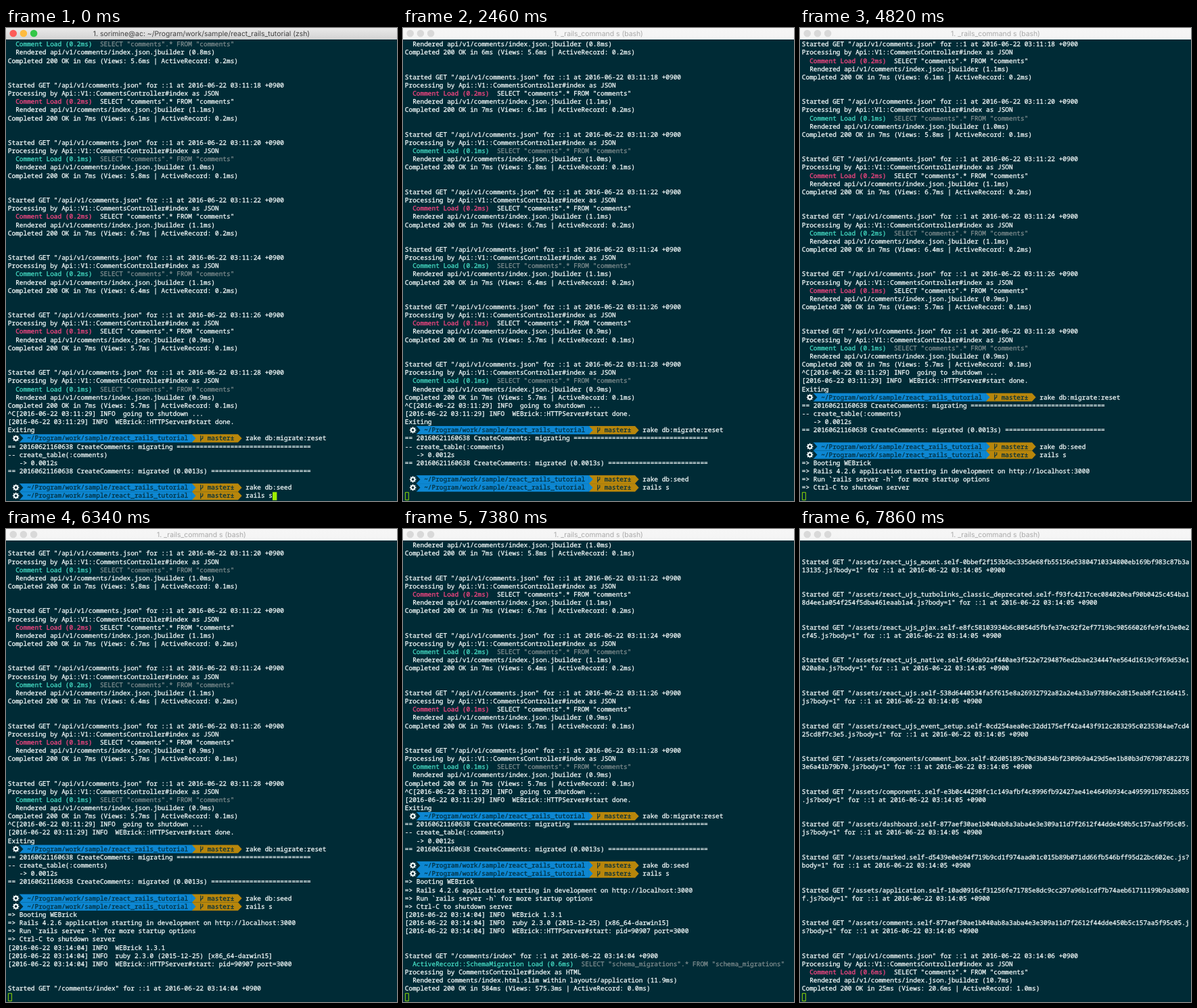
Recreate the animation shown at these times as an HTML page with a canvas. Size 578 px wide and 700 px high, loop 8 s.

```html
<!DOCTYPE html>
<html lang="en">
<head>
<meta charset="utf-8">
<title>Rails server start</title>
<style>
html, body { margin: 0; width: 100%; height: 100%; overflow: hidden; background: #002b36; }
canvas { display: block; width: 578px; height: 700px; }
</style>
</head>
<body>
<canvas id="stage"></canvas>
<script>
const W = 578, H = 700, LOOP = 8000;
const LEFT = 2.8, TOP = 18, CELL = 5.67, LINE = 12.15;
const COLS = 101, ROWS = 56, BAR = 17;
const MONO = '"Noto Sans Mono", "DejaVu Sans Mono", monospace';
const SANS = 'Inter, "Liberation Sans", sans-serif';
const C = {
  bg: '#002b36', text: '#f2f9f9', dim: '#7d8b8d', pink: '#fb4683', cyan: '#45dcc4',
  blue: '#0d87d2', gold: '#b8860b', ink: '#04303f', cursor: '#9fee00'
};

const canvas = document.getElementById('stage');
const ratio = window.devicePixelRatio || 1;
canvas.width = W * ratio;
canvas.height = H * ratio;
const ctx = canvas.getContext('2d');
ctx.scale(ratio, ratio);

// A row is a list of spans: [column, text, colour].
const plain = text => [[0, text, C.text]];
const blank = () => [];

function wrap(text) {
  const rows = [];
  for (let i = 0; i < text.length; i += COLS) rows.push(plain(text.slice(i, i + COLS)));
  return rows;
}

function load(model, ms, table, hot) {
  const head = `${model} Load (${ms}ms)`;
  return [
    [2, head, hot ? C.pink : C.cyan],
    [head.length + 4, `SELECT "${table}".* FROM "${table}"`, hot ? C.text : C.dim]
  ];
}

const started = (path, time) => `Started GET "${path}" for ::1 at 2016-06-22 ${time} +0900`;
const completed = (total, views, db) =>
  plain(`Completed 200 OK in ${total}ms (Views: ${views}ms | ActiveRecord: ${db}ms)`);
const info = (time, text) => plain(`[2016-06-22 ${time}] INFO  ${text}`);

const apiStart = time => [
  plain(started('/api/v1/comments.json', time)),
  plain('Processing by Api::V1::CommentsController#index as JSON')
];
const apiEnd = (db, render, total, views, hot, dbTotal = db) => [
  load('Comment', db, 'comments', hot),
  plain(`  Rendered api/v1/comments/index.json.jbuilder (${render}ms)`),
  completed(total, views, dbTotal)
];
const poll = (sec, ...rest) => [blank(), blank(), ...apiStart('03:11:' + sec), ...apiEnd(...rest)];

function prompt(command) {
  const row = [
    [5, '~/Program/work/sample/react_rails_tutorial', C.ink],
    [52, 'master±', C.ink],
    [62, command, C.text]
  ];
  row.isPrompt = true;
  return row;
}

const migration = state => plain(`== 20160621160638 CreateComments: ${state} `.padEnd(79, '='));

const history = [
  ...apiEnd('0.2', '0.8', 6, '5.6', false),
  ...poll(18, '0.2', '1.1', 7, '6.1', true),
  ...poll(20, '0.1', '1.0', 7, '5.8', false),
  ...poll(22, '0.2', '1.1', 7, '6.7', true),
  ...poll(24, '0.2', '1.1', 7, '6.4', false),
  ...poll(26, '0.1', '0.9', 7, '5.7', true),
  ...poll(28, '0.1', '0.9', 7, '5.7', false),
  plain('^C[2016-06-22 03:11:29] INFO  going to shutdown ...'),
  info('03:11:29', 'WEBrick::HTTPServer#start done.'),
  plain('Exiting'),
  prompt('rake db:migrate:reset'),
  migration('migrating'),
  plain('-- create_table(:comments)'),
  plain('   -> 0.0012s'),
  migration('migrated (0.0013s)'),
  blank(),
  prompt('rake db:seed'),
  prompt('rails s')
];

const assets = [
  'react_ujs_mount.self-0bbef2f153b5bc335de68fb55156e53804710334800eb169bf983c87b3a13135',
  'react_ujs_turbolinks_classic_deprecated.self-f93fc4217cec084020eaf90b0425c454ba18d4ee1a054f254f5dba461eaab1a4',
  'react_ujs_pjax.self-e8fc58103934b6c8054d5fbfe37ec92f2ef7719bc90566026fe9fe19e0e2cf45',
  'react_ujs_native.self-69da92af440ae3f522e7294876ed2bae234447ee564d1619c9f69d53e1020a8a',
  'react_ujs.self-538d6440534fa5f615e8a26932792a82a2e4a33a97886e2d815eab8fc216d415',
  'react_ujs_event_setup.self-0cd254aea0ec32dd175eff42a443f912c283295c0235384ae7cd425cd8f7c3e5',
  'components/comment_box.self-02d05189c70d3b034bf2309b9a429d5ee1b80b3d767987d822783e6a41b79b70',
  'components.self-e3b0c44298fc1c149afbf4c8996fb92427ae41e4649b934ca495991b7852b855',
  'dashboard.self-877aef30ae1b040ab8a3aba4e3e309a11d7f2612f44dde450b5c157aa5f95c05',
  'marked.self-d5439e0eb94f719b9cd1f974aad01c015b89b071dd66fb546bff95d22bc602ec',
  'application.self-10ad0916cf31256fe71785e8dc9cc297a96b1cdf7b74aeb61711199b9a3d003f',
  'comments.self-877aef30ae1b040ab8a3aba4e3e309a11d7f2612f44dde450b5c157aa5f95c05'
];

const ENTER = 420, BASH = 960, BLUR = 2280;

// Server output: [time, rows].
const output = [
  [4460, [
    plain('=> Booting WEBrick'),
    plain('=> Rails 4.2.6 application starting in development on http://localhost:3000'),
    plain('=> Run `rails server -h` for more startup options'),
    plain('=> Ctrl-C to shutdown server')
  ]],
  [5460, [
    info('03:14:04', 'WEBrick 1.3.1'),
    info('03:14:04', 'ruby 2.3.0 (2015-12-25) [x86_64-darwin15]'),
    info('03:14:04', 'WEBrick::HTTPServer#start: pid=90907 port=3000')
  ]],
  [6320, [blank(), blank(), plain(started('/comments/index', '03:14:04'))]],
  [6420, [load('ActiveRecord::SchemaMigration', '0.6', 'schema_migrations', false)]],
  [6500, [plain('Processing by CommentsController#index as HTML')]],
  [7100, [
    plain('  Rendered comments/index.html.slim within layouts/application (11.9ms)'),
    completed(584, '575.3', '0.0')
  ]],
  ...assets.map((name, i) => [7400 + 20 * i, [
    blank(), blank(), ...wrap(started(`/assets/${name}.js?body=1`, '03:14:05'))
  ]]),
  [7780, [blank(), blank(), ...apiStart('03:14:06')]],
  [7820, apiEnd('0.6', '10.7', 25, '20.6', true, '1.0')]
];

const colX = col => LEFT + col * CELL;

function fillPath(color, ...points) {
  ctx.fillStyle = color;
  ctx.beginPath();
  points.forEach(([x, y]) => ctx.lineTo(x, y));
  ctx.fill();
}

function strokePath(color, width, ...points) {
  ctx.strokeStyle = color;
  ctx.lineWidth = width;
  ctx.beginPath();
  points.forEach(([x, y], i) => i ? ctx.lineTo(x, y) : ctx.moveTo(x, y));
  ctx.stroke();
}

function arrow(col, y, color) {
  const x = colX(col);
  fillPath(color, [x, y], [x + CELL, y + LINE / 2], [x, y + LINE]);
}

function gear(x, y) {
  for (let i = 0; i < 8; i++) {
    const a = i * Math.PI / 4, dx = Math.cos(a), dy = Math.sin(a);
    strokePath(C.text, 1.4, [x + dx * 3, y + dy * 3], [x + dx * 4.8, y + dy * 4.8]);
  }
  ctx.lineWidth = 2;
  ctx.beginPath();
  ctx.arc(x, y, 2.8, 0, Math.PI * 2);
  ctx.stroke();
}

function drawPrompt(y) {
  ctx.fillStyle = C.blue;
  ctx.fillRect(colX(3), y, 45 * CELL, LINE);
  ctx.fillStyle = C.gold;
  ctx.fillRect(colX(48), y, 12 * CELL, LINE);
  arrow(3, y, C.bg);
  arrow(48, y, C.blue);
  arrow(60, y, C.gold);
  gear(14.6, y + 6);
  const x = colX(50) + 1.5;
  strokePath(C.ink, 1.1, [x, y + 2], [x, y + 10.5]);
  strokePath(C.ink, 1.1, [x, y + 8], [x + 3, y + 6], [x + 3, y + 2.5]);
}

function drawRow(row, index) {
  const y = TOP + index * LINE;
  if (row.isPrompt) drawPrompt(y);
  ctx.font = `500 ${CELL / 0.6}px ${MONO}`;
  // A hairline outline gives the slightly heavy terminal weight.
  ctx.lineWidth = 0.3;
  ctx.lineJoin = 'round';
  for (const [col, text, color] of row) {
    ctx.fillStyle = ctx.strokeStyle = color;
    [...text].forEach((ch, i) => {
      if (ch === ' ') return;
      ctx.fillText(ch, colX(col + i), y + 9.2);
      ctx.strokeText(ch, colX(col + i), y + 9.2);
    });
  }
}

function drawCursor(col, active) {
  const x = colX(col), y = TOP + (ROWS - 1) * LINE + 0.5;
  if (active) {
    ctx.fillStyle = C.cursor;
    ctx.fillRect(x, y, 6.4, LINE);
  } else {
    ctx.strokeStyle = C.cursor;
    ctx.lineWidth = 0.9;
    ctx.strokeRect(x + 0.6, y + 0.5, 5, LINE - 1);
  }
}

function drawBar(title, active) {
  const shade = ctx.createLinearGradient(0, 0, 0, BAR);
  shade.addColorStop(0, active ? '#e9e9e9' : '#f6f6f6');
  shade.addColorStop(1, active ? '#d3d3d3' : '#f4f4f4');
  ctx.fillStyle = shade;
  ctx.fillRect(0, 0, W, BAR);
  const lights = active ? ['#fc5b57', '#fdbb3f', '#34c748'] : ['#d9d9d9', '#d9d9d9', '#d9d9d9'];
  lights.forEach((color, i) => {
    ctx.fillStyle = color;
    ctx.beginPath();
    ctx.arc(10.7 + 15.2 * i, 8, 5.3, 0, Math.PI * 2);
    ctx.fill();
  });
  ctx.font = `400 10.4px ${SANS}`;
  ctx.fillStyle = active ? '#404040' : '#a9a9a9';
  ctx.textAlign = 'center';
  ctx.fillText(title, W / 2, 12);
  ctx.textAlign = 'left';
}

// Mouse pointer sliding out to the right edge.
function drawPointer(t) {
  const p = Math.min(1, (t - 1380) / 240);
  const k = p * p * (3 - 2 * p);
  const x = 416 + 143 * k, y = 536 - 9 * k, mid = x + 3.5;
  strokePath('#c9d3d5', 1.2, [x + 1, y + 0.7], [mid, y + 2], [mid, y + 12], [x + 1, y + 13.3]);
  strokePath('#c9d3d5', 1.2, [x + 6, y + 0.7], [mid, y + 2]);
  strokePath('#c9d3d5', 1.2, [x + 6, y + 13.3], [mid, y + 12]);
}

function titleAt(t) {
  if (t < ENTER) return '1. sorimine@ac: ~/Program/work/sample/react_rails_tutorial (zsh)';
  return `1. _rails_command s (${t < BASH ? 'zsh' : 'bash'})`;
}

function draw(t) {
  const active = t < BLUR, typed = t >= ENTER;
  const rows = [...history];
  for (const [time, lines] of output) if (t >= time) rows.push(...lines);
  if (typed) rows.push(blank());

  ctx.fillStyle = C.bg;
  ctx.fillRect(0, 0, W, H);
  ctx.textRendering = 'geometricPrecision';
  rows.slice(-ROWS).forEach(drawRow);
  drawCursor(typed ? 0 : 69, active);
  if (t >= 1380 && t < 1780) drawPointer(t);
  drawBar(titleAt(t), active);
}

const origin = performance.now();
let last = -1;

function tick() {
  const now = Math.max(0, performance.now() - origin) % LOOP;
  const t = Math.floor(now / 20) * 20;
  if (t !== last) draw(last = t);
  requestAnimationFrame(tick);
}
tick();
</script>
</body>
</html>
```
